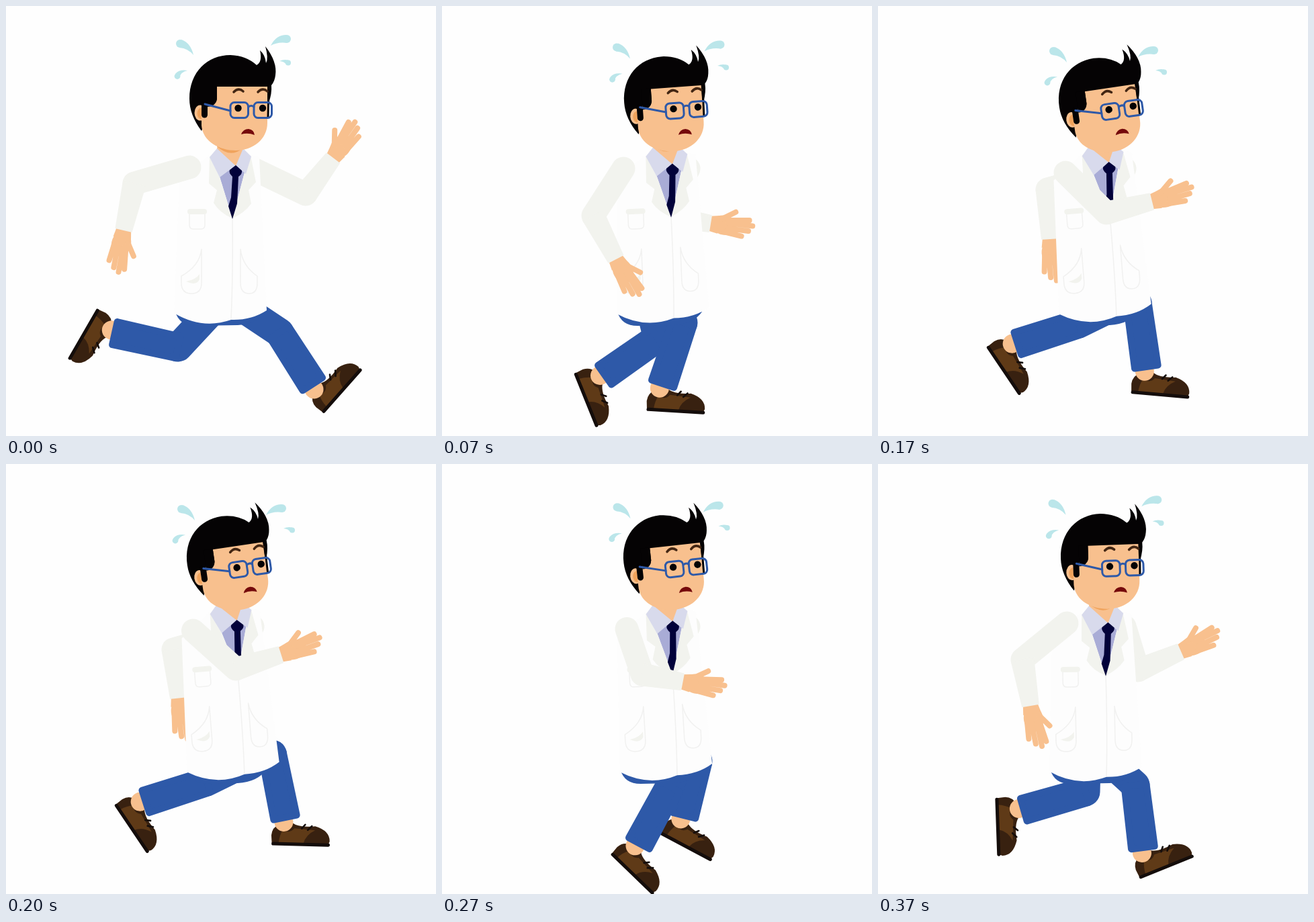
An HTML page with a canvas that plays this animation: 640x640 px, repeating every 410 ms.

```html
<!DOCTYPE html>
<html lang="en">
<head>
<meta charset="utf-8">
<title>Running doctor</title>
<style>
  html, body { margin: 0; height: 100%; overflow: hidden; background: #fefefe; }
  canvas { display: block; }
</style>
</head>
<body>
<canvas id="stage" width="640" height="640"></canvas>
<script>
const ctx = document.getElementById('stage').getContext('2d');
const LOOP = 410;
const STARTS = [0, 30, 70, 130, 170, 200, 230, 270, 330, 370];
const PHASE = [0, 1, 2, 3, 4, 4, 4, 3, 2, 1];   // body lean, in quarters

const SKIN = '#f8c08e', SHADE = '#f0a35c', BLUE = '#2e59a8', HAIR = '#050304';
const COAT = '#fdfdfd', TRIM = '#f2f3ee', SEAM = '#f1f1f0', DROP = '#bbe6ea';
const SHOE = '#382110', LEATHER = '#5f3a17', SOLE = '#140d0b';

// Legs: knee, ankle, shoe angle. A missing step lies midway between its neighbours.
const legA = [
  [256, 508, 157, 486, 120], , [321, 494, 238, 552, 68], [331, 470, 259, 541, 28],
  [386, 442, 400, 542, 5], , [407, 422, 433, 520, -2], , [355, 463, 285, 536, 58],
  [309, 488, 212, 516, 88]];
// This leg swings forth and back with the lean.
const legB = [
  [407, 486, 459, 567, -48.5], [383, 478, 395, 576, -22], [359, 471, 327, 567, 3.5],
  [339, 480, 291, 569, 44], [299, 473, 203, 504, 56]];
// Near arm: shoulder, elbow, wrist.
const nearArm = [
  [273, 240, 191, 264, 175, 334], , [270, 242, 225, 312, 259, 377],
  [263, 247, 273, 330, 339, 356], [279, 248, 340, 308, 408, 291], ,
  [278, 248, 344, 302, 411, 276], , [272, 243, 252, 324, 306, 373],
  [281, 237, 215, 291, 227, 360]];
// Far arm: elbow, wrist.
const farArm = [
  [446, 280, 487, 226], [387, 307, 451, 279], [332, 313, 400, 324], [270, 320, 310, 340],
  [252, 273, 256, 347], , [246, 279, 258, 350], , [332, 314, 399, 328], [387, 307, 451, 279]];

function pose(track, i) {
  if (track[i]) return track[i];
  return track[i - 1].map((v, k) => (v + track[i + 1][k]) / 2);
}

function fill(color, d) {
  ctx.fillStyle = color;
  ctx.fill(new Path2D(d));
}

function line(color, width, d) {
  ctx.strokeStyle = color;
  ctx.lineWidth = width;
  ctx.stroke(new Path2D(d));
}

function oval(color, x, y, rx, ry = rx) {
  ctx.fillStyle = color;
  ctx.beginPath();
  ctx.ellipse(x, y, rx, ry, 0, 0, 7);
  ctx.fill();
}

function at(x, y, angle, draw) {
  ctx.save();
  ctx.translate(x, y);
  ctx.rotate(angle);
  draw();
  ctx.restore();
}

function turnedAbout(x, y, angle, draw) {
  at(x, y, angle, () => { ctx.translate(-x, -y); draw(); });
}

// Round upper part, tapering lower part with corners of radius r.
function limb(color, [ax, ay], [bx, by], [cx, cy], w, endW, r) {
  line(color, w, `M${ax},${ay}L${bx},${by}`);
  const length = Math.hypot(cx - bx, cy - by);
  at(bx, by, Math.atan2(cy - by, cx - bx), () => {
    const h = w / 2 - r, e = endW / 2 - r;
    const d = `M0,${-h}L${length - r},${-e}V${e}L0,${h}Z`;
    fill(color, d);
    line(color, 2 * r, d);
  });
}

function hand() {
  oval(SKIN, 20, -1, 19, 14.5);
  fill(SKIN, 'M-2,-11L12,-14V13L-2,11Z');
  line(SKIN, 8, 'M16,-10L34,-23M24,-9L56,-14M26,-5L62,-6.5M26,3L57,2M22,9L48,11');
}

function arm(shoulder, elbow, wrist) {
  at(...wrist, Math.atan2(wrist[1] - elbow[1], wrist[0] - elbow[0]), hand);
  limb(TRIM, shoulder, elbow, wrist, 35, 26, 1);
}

function shoe() {
  fill(SHOE, 'M-20,34L-21,22Q-20,10 -10,6L10,3Q20,10 44,7Q66,13 66,29L64,34Z');
  fill(LEATHER, 'M-4,13Q6,20 13,11L44,13Q30,20 27,33H-10Q-9,22 -4,13Z');
  line(SOLE, 5, 'M-18,34.5H64');
  line(SOLE, 2.6, 'M24,11L29,5M33,13L39,7');
  oval(SKIN, -3, 2, 14);
}

function leg(hip, [kx, ky, ax, ay, angle]) {
  at(ax, ay, angle * Math.PI / 180, shoe);
  limb(BLUE, hip, [kx, ky], [ax, ay], 43, 45, 5);
}

function torso() {
  fill(COAT, 'M303,222L258,258L250,457Q292,482 335,467Q365,468 388,453L377,225L365,222Z');
  line(SEAM, 1.5, 'M337,314Q338,400 335,466');
  line(SEAM, 1.5, 'M273,310V326Q273,332 279,332H290Q296,332 296,326V310');
  line(SEAM, 1.5, 'M291,362V412Q291,428 276,428Q261,428 261,412V402Q288,387 291,362');
  line(SEAM, 1.5, 'M349,362V412Q349,428 362,428Q374,428 374,412V402Q352,387 349,362');
  fill(TRIM, 'M268,410Q283,407 288,399V407Q283,417 268,410Z');
  line(TRIM, 8, 'M274,306H295');

  fill('#a9acd6', 'M318,254L342,237L355,248L337,316Z');
  fill(TRIM, 'M303,224L302,264L314,274L309,293Q318,308 337,316L318,255Z');
  fill(TRIM, 'M364,222L372,262L361,274L365,294Q355,308 337,316L355,248Z');
  fill('#d8daec', 'M314,212L303,225L318,255L342,237L357,250L365,224L353,212Z');
  fill(SKIN, 'M316,200L314,212L342,238L353,212V200Z');
  fill(SHADE, 'M314,209Q334,227 352,212V204H314Z');
  fill('#02023a', 'M342,237L333,244Q331,248 337,254L335,285L331,298L337,317L344,294L346,254Q352,250 351,245Z');
}

function head() {
  oval(SKIN, 289, 159, 9, 12);
  fill(HAIR, `M291,186Q273,162 273,138C273,98 300,73 334,73Q358,74 373,88Q382,83 378,66
    Q386,73 387,85Q391,78 386,60Q404,83 401,103Q400,112 395,118Q396,130 391,144H300V160Z`);
  oval(SKIN, 289, 159, 8.5, 11.5);
  oval(SHADE, 291, 160, 6.5, 8.5);
  fill(SKIN, 'M291,150V178C293,202 318,215 342,215C368,215 389,198 389,174V120H314V138Q312,150 300,150Z');
  fill(HAIR, 'M300,119H314V138Q312,150 300,150Z');
  line(HAIR, 9, 'M295.5,146V162');
  line(HAIR, 3, 'M391,125L390,165');

  line('#432613', 3.6, 'M339,128Q346,121 353,127M375,128Q382,121 389,127');
  oval(HAIR, 345.5, 152, 5.2);
  oval(HAIR, 382, 152, 5.2);
  fill('#75090b', 'M350,191Q353,183 361,183Q369,184 370,192Q360,188 350,191Z');
  ctx.beginPath();
  ctx.roundRect(334, 143.5, 26.5, 23, 6);
  ctx.roundRect(369, 143.5, 26.5, 23, 6);
  ctx.strokeStyle = BLUE;
  ctx.lineWidth = 3;
  ctx.stroke();
  line(BLUE, 3, 'M361,150Q365,147 369,150M296,146L334,156');
}

function drop(dx, dy, x, y, r, tail) {
  ctx.save();
  ctx.translate(dx, dy);
  oval(DROP, x, y, r);
  fill(DROP, tail);
  ctx.restore();
}

function sweat(p) {
  drop(2 * p, 11 * p, 259, 56, 6, 'M261,50Q275,55 279,73Q271,63 258,62Z');
  drop(-3 * p, 9.5 * p, 255, 104.5, 4.4, 'M252,101Q258,94 270,96Q260,98 258,107Z');
  drop(-7 * p, 17 * p, 418, 49, 6, 'M417,43Q402,43 394,59Q404,53 419,55Z');
  drop(6 * p, 14 * p, 420, 84.5, 4, 'M420,80.5Q413,79 407,82Q414,82 418,88Z');
}

function draw(now) {
  const t = now % LOOP;
  const step = STARTS.findLastIndex(start => start <= t);
  const p = PHASE[step] / 4;
  const far = pose(farArm, step), near = pose(nearArm, step);

  ctx.fillStyle = '#fefefe';
  ctx.fillRect(0, 0, 640, 640);
  ctx.lineCap = ctx.lineJoin = 'round';

  arm([367, 242], far.slice(0, 2), far.slice(2));
  leg([310, 450], pose(legA, step));
  leg([350, 448], legB[PHASE[step]]);
  const left = 252 + 18 * p;
  fill(BLUE, `M${left},455Q${left + 6},476 ${left + 30},476L345,475Q375,473 387,455Z`);
  turnedAbout(280, 215, -0.08 * p, torso);
  turnedAbout(360, 166, -0.145 * p, head);
  sweat(p);
  arm(near.slice(0, 2), near.slice(2, 4), near.slice(4));
}

function tick() {
  draw(performance.now());
  requestAnimationFrame(tick);
}
tick();
</script>
</body>
</html>
```
